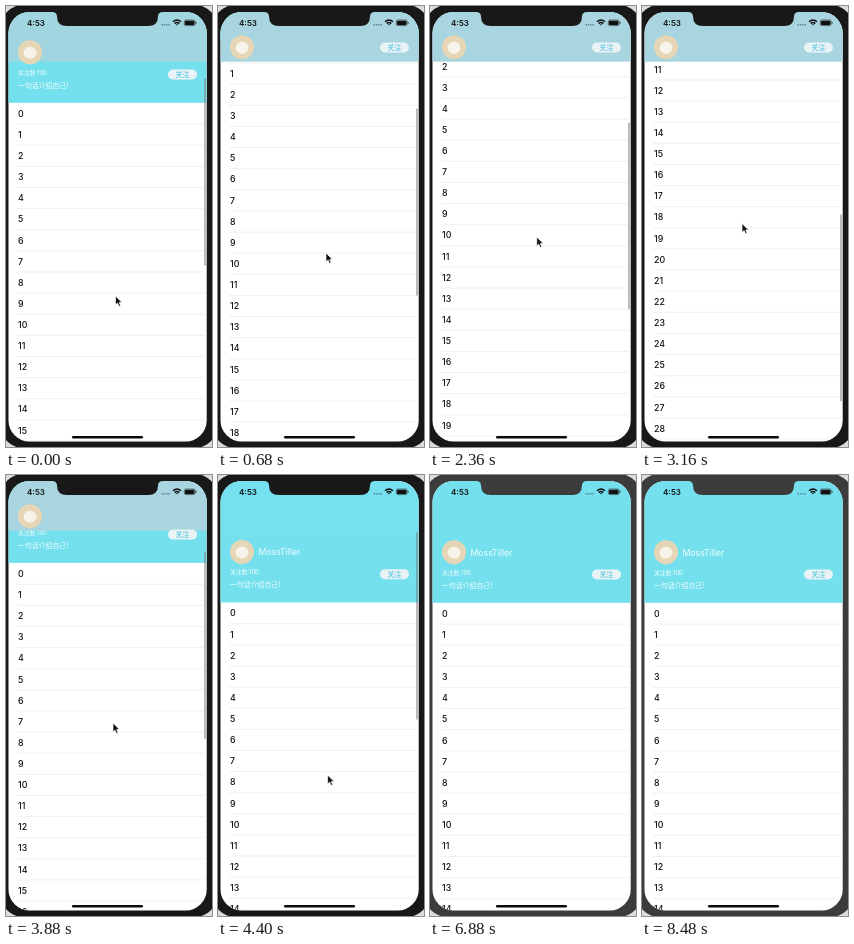
Animation, 206 px wide and 441 px high, one loop 8520 ms. Source, as an HTML page:

```html
<!DOCTYPE html>
<html lang="zh">
<head>
<meta charset="utf-8">
<style>
  html, body { margin: 0; width: 100%; height: 100%; overflow: hidden; background: #dcdcdc; }
  svg { display: block; width: 206px; height: 441px; font-family: Inter, "Noto Sans CJK SC", "Noto Sans CJK", sans-serif; }
  .row { font-size: 8.8px; font-weight: 500; fill: #111; }
  .line { stroke: #e6e6e8; stroke-width: .6; }
  .light { fill: #fff; fill-opacity: .9; }
</style>
</head>
<body>
<svg viewBox="0 0 206 441">
  <defs>
    <clipPath id="screen"><rect x="2.5" y="6" width="198.2" height="429.5" rx="21"/></clipPath>
  </defs>
  <rect id="bezel" x="-5" y="-1" width="216" height="443" rx="22" fill="#181818"/>
  <g clip-path="url(#screen)">
    <rect width="206" height="441" fill="#fff"/>
    <g id="content">
      <g id="rows"></g>
      <rect y="-20" width="206" height="147.8" fill="#74e0ee"/>
      <text id="name" class="light" x="40.5" y="80.8" font-size="8.7">MossTiller</text>
      <text class="light" x="12" y="99.7" font-size="5.8">关注数:100</text>
      <text class="light" x="12" y="112.6" font-size="6.9">一句话介绍自己!</text>
    </g>
    <rect id="nav" width="206" height="55.7" fill="#a8d5df"/>
    <g id="avatar">
      <circle cx="24" cy="77.3" r="12" fill="#e6d6b5"/>
      <ellipse cx="24" cy="77.8" rx="6.5" ry="6" fill="#f6f3ea"/>
    </g>
    <g id="follow">
      <rect x="162" y="94.5" width="29" height="10" rx="5" fill="#e9f3f5"/>
      <text x="176.5" y="102.1" font-size="6.9" font-weight="500" text-anchor="middle" fill="#39bbdc">关注</text>
    </g>
    <rect id="bar" x="198.3" width="1.4" height="187" rx=".7" fill="#777"/>
    <rect x="66" y="430" width="71" height="2.6" rx="1.3" fill="#0a0a0a"/>
  </g>
  <path id="notch" d="M46 5V6Q51 6 51 10.5Q51 20 61 20H142Q152 20 152 10.5Q152 6 157 6V5Z" fill="#181818"/>
  <text x="21" y="19.6" font-size="8" font-weight="600" fill="#111">4:53</text>
  <path d="M155.5 18.8H164" stroke="#5b878f" stroke-width="1.4" stroke-dasharray="1.4 .9"/>
  <g fill="none" stroke="#111" stroke-width="1.5">
    <path d="M167 15.8Q171 12.2 175 15.8M168.7 17.6Q171 15.5 173.3 17.6"/>
    <path d="M169.8 18.2H172.2L171 19.6Z" fill="#111" stroke="none"/>
  </g>
  <rect x="178.3" y="14" width="10.8" height="5.6" rx="1.5" fill="none" stroke="#222" stroke-width=".6"/>
  <rect x="179" y="14.7" width="9.4" height="4.2" rx=".9" fill="#111"/>
  <rect x="189.6" y="15.9" width=".9" height="1.9" rx=".4" fill="#222"/>
  <path id="cursor" d="M0 0V9L2.1 7.1L3.5 10.4L5.1 9.7L3.7 6.5H6.5Z" fill="#111" stroke="#fff" stroke-width=".7"/>
</svg>
<script>
const LOOP = 8520, ROW = 21.12, HEADER = 128;
const el = id => document.getElementById(id);
const clamp = v => Math.max(0, Math.min(1, v));

// keys: [time, value], joined by smooth curves without overshoot
const scrollKeys = [[0, 31], [680, 92], [880, 94], [1520, 25], [1760, 12], [2300, 115],
  [2550, 135], [3160, 307.4], [3260, 312], [3880, 40], [4450, 0]];
const cursorX = [[0, 109.5], [680, 108], [1520, 114], [3160, 100], [3880, 107], [4700, 112], [5250, 212]];
const cursorY = [[0, 290], [680, 247], [880, 246], [1520, 303], [1800, 312], [2300, 225],
  [2650, 300], [3160, 217.5], [3400, 212], [3880, 248], [4400, 300]];

function slope(keys, i) {
  if (i < 1 || i > keys.length - 2) return 0;
  const [a, b, c] = keys.slice(i - 1, i + 2);
  const d1 = (b[1] - a[1]) / (b[0] - a[0]), d2 = (c[1] - b[1]) / (c[0] - b[0]);
  return d1 * d2 > 0 ? 2 * d1 * d2 / (d1 + d2) : 0;
}

function sample(keys, t) {
  const i = keys.findIndex(k => k[0] > t) - 1;
  if (i < 0) return keys[keys.length - 1][1];
  const [t0, v0] = keys[i], [t1, v1] = keys[i + 1];
  const h = t1 - t0, u = (t - t0) / h, w = 1 - u;
  return v0 * w * w * (1 + 2 * u) + v1 * u * u * (3 - 2 * u)
    + h * u * w * (slope(keys, i) * w - slope(keys, i + 1) * u);
}

let list = "";
for (let i = 0; i < 40; i++) {
  const y = HEADER + i * ROW;
  list += `<text class="row" x="12" y="${y + 13.8}">${i}</text>
    <path class="line" d="M11 ${y + ROW}H201"/>`;
}
el("rows").innerHTML = list;

const move = (id, x, y) => el(id).setAttribute("transform", `translate(${x} ${y})`);
const fade = (id, v) => el(id).setAttribute("opacity", v);

function draw(now) {
  const t = now % LOOP;
  const s = sample(scrollKeys, t);
  const cover = clamp(s / 36);
  move("content", 0, -s);
  move("avatar", 0, -Math.min(s, 36));
  move("follow", 0, -Math.min(s, 58));
  move("bar", 0, 57.4 + s * .491);
  move("cursor", sample(cursorX, t), sample(cursorY, t));
  fade("nav", cover);
  fade("name", clamp(1 - cover * 1.5));
  fade("bar", .7 * (1 - clamp((t - 4850) / 300)));
  const frame = t < 6600 ? "#181818" : "#3c3c3c";
  el("bezel").setAttribute("fill", frame);
  el("notch").setAttribute("fill", frame);
  requestAnimationFrame(() => draw(performance.now()));
}
draw(0);
</script>
</body>
</html>
```
